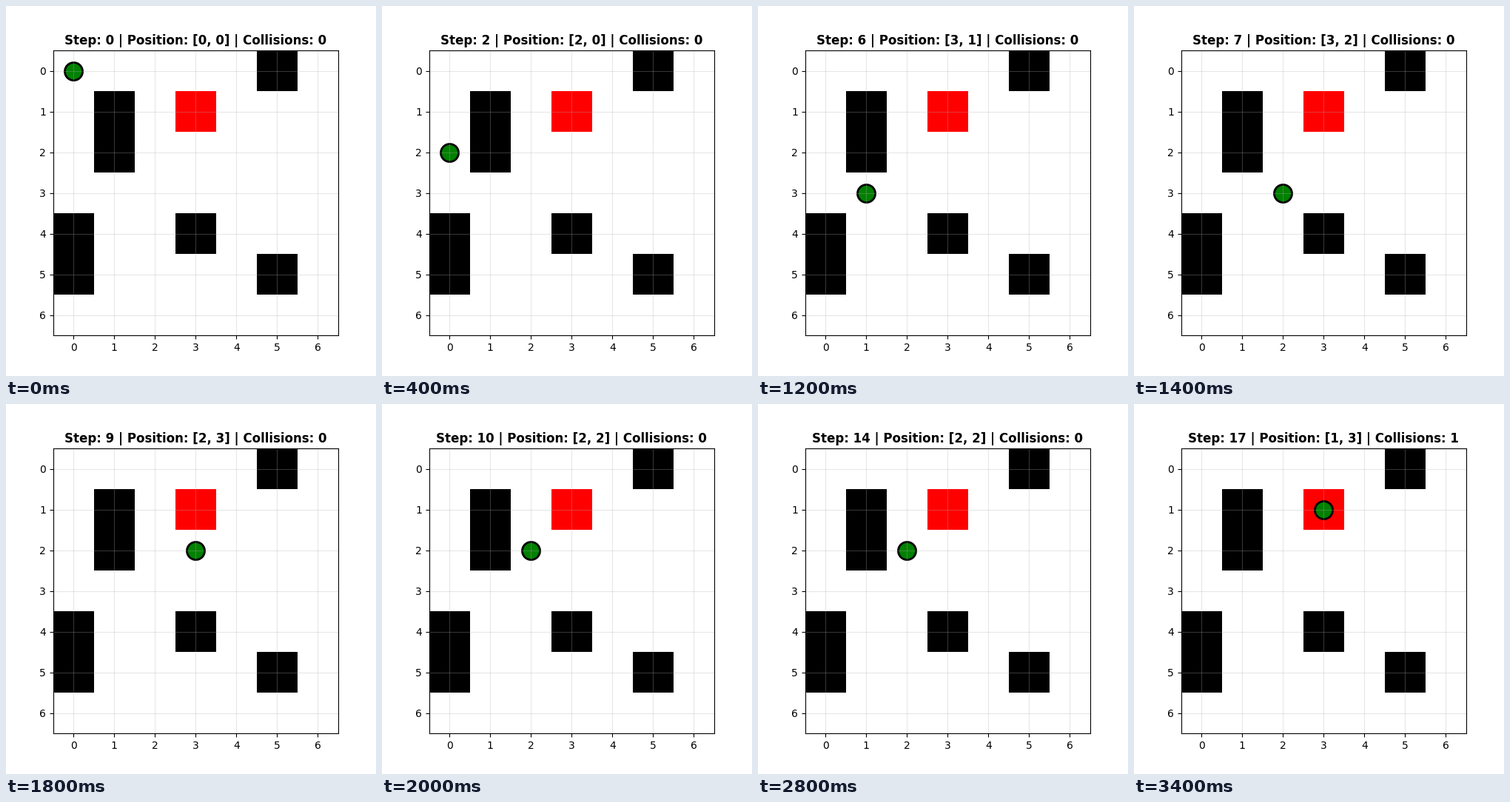
Write a matplotlib script that moves like this. It is 500 by 500 pixels and loops after 3.6 s.

```python
import numpy as np
import matplotlib.pyplot as plt
from matplotlib.animation import FuncAnimation
from matplotlib.colors import ListedColormap

SIZE = 7
INTERVAL = 200
START = (0, 0)
GOAL = (1, 3)
OBSTACLES = [(0, 5), (1, 1), (2, 1), (4, 0), (4, 3), (5, 0), (5, 5)]
MOVES = {"U": (-1, 0), "D": (1, 0), "L": (0, -1), "R": (0, 1)}
ACTIONS = "DDDRDURURLRLDUULR"


def walk():
    """List the position and collision count after each step."""
    pos, hits = START, 0
    states = [(pos, hits)]
    for action in ACTIONS:
        dr, dc = MOVES[action]
        target = (pos[0] + dr, pos[1] + dc)
        if target in OBSTACLES:
            hits += 1
        else:
            pos = target
        states.append((pos, hits))
    return states


states = walk()

grid = np.zeros((SIZE, SIZE))
for cell in OBSTACLES:
    grid[cell] = 1
grid[GOAL] = 2

fig, ax = plt.subplots(figsize=(5, 5), dpi=100)
ax.imshow(grid, cmap=ListedColormap(["white", "black", "red"]), vmin=0, vmax=2)
agent = ax.scatter([START[1]], [START[0]], s=300, c="green",
                   edgecolors="black", linewidths=2)
ax.set_xlim(-0.5, SIZE - 0.5)
ax.set_ylim(SIZE - 0.5, -0.5)
ax.set_xticks(range(SIZE))
ax.set_yticks(range(SIZE))
ax.grid(True, alpha=0.3)
title = ax.set_title("", fontsize=12, fontweight="bold")


def update(step):
    (row, col), hits = states[step]
    agent.set_offsets([[col, row]])
    title.set_text(f"Step: {step} | Position: [{row}, {col}] | Collisions: {hits}")
    return agent, title


anim = FuncAnimation(fig, update, frames=len(states), interval=INTERVAL,
                     repeat=True, repeat_delay=0)
plt.show()
```
